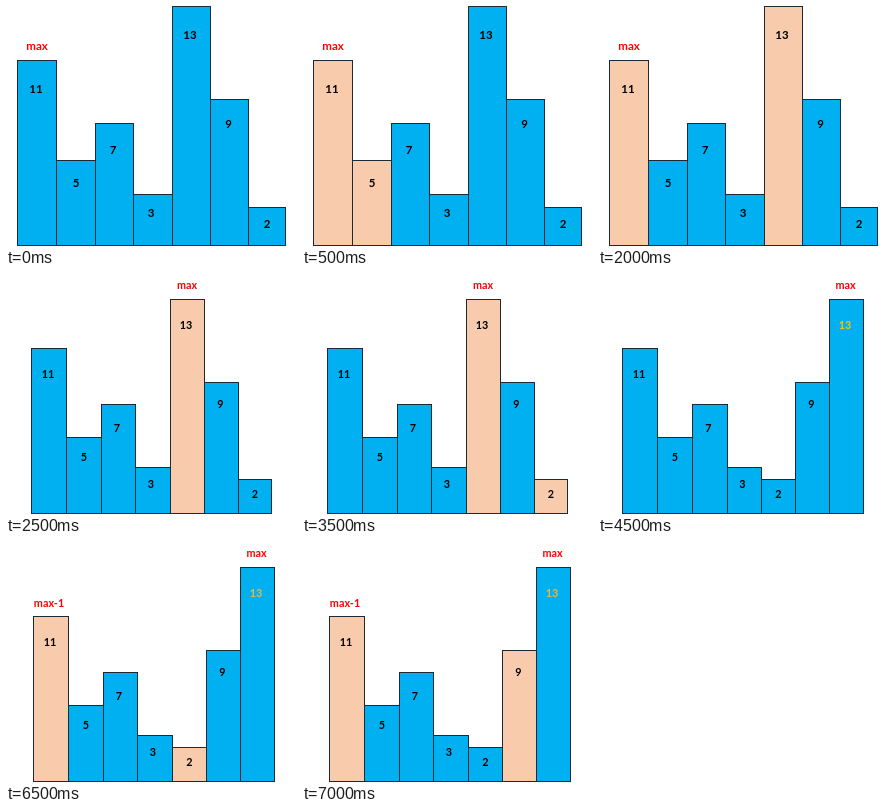
An HTML page for the animation above (7.5 s loop, 290 by 240 pixels).

```html
<!DOCTYPE html>
<html lang="en">
<head>
<meta charset="utf-8">
<title>Selection sort</title>
<style>
html, body { margin: 0; width: 100%; height: 100%; overflow: hidden; background: #fff; }
svg { display: block; }
text { font-family: Lato, "Open Sans", sans-serif; font-weight: 700; text-anchor: middle; }
rect { stroke: #1c2b33; stroke-width: 1; }
</style>
</head>
<body>
<svg id="stage" width="290" height="240" viewBox="0 0 290 240"></svg>
<script>
const STEP = 500, BASE = 239;
const BLUE = '#00b0f0', PEACH = '#f7cbac', RED = '#f00';

// Per value: bar height, number's drop below the top, its offset from the middle
const BARS = {
  11: [185, 29, -1], 5: [85, 23, 0], 7: [122, 27, -1.5], 3: [51, 19, -2],
  13: [239, 29, -1.5], 9: [146, 24.5, -1], 2: [38, 17, 0]
};
const start = [11, 5, 7, 3, 13, 9, 2];
const swapped = [11, 5, 7, 3, 2, 9, 13];

const wide = {
  order: start, scale: 1, size: 11.5,
  edges: [11, 50, 89, 127, 166, 204, 242, 279],
  labels: [['max', 31, 40]]
};
const found = {
  order: start, scale: 0.894, size: 10.8,
  edges: [25, 60, 95, 129, 164, 198, 232, 265],
  labels: [['max', 181, 11]]
};
const moved = {
  ...found, order: swapped,
  edges: [24, 59, 94, 129, 163, 197, 231, 265],
  labels: [['max', 247.5, 11]]
};
const placed = { ...moved, done: '#ffc000' };
const second = {
  ...moved, done: '#e3b84a',
  edges: [27, 62, 97, 131, 166, 200, 234, 268],
  labels: [['max', 250.5, 11], ['max-1', 43, 61]]
};

// Each step: layout, then the values being compared
const steps = [
  [wide], [wide, 11, 5], [wide, 11, 7], [wide, 11, 3], [wide, 11, 13],
  [found, 13], [found, 13, 9], [found, 13, 2],
  [moved, 13, 2], [placed],
  ...[5, 7, 3, 2, 9].map(v => [second, 11, v])
];

const stage = document.getElementById('stage');

function label(text, x, y, size, fill) {
  return `<text x="${x}" y="${y + size * 0.36}" font-size="${size}" fill="${fill}">${text}</text>`;
}

function draw([layout, ...active]) {
  const { order, scale, size, edges, labels, done } = layout;
  const bars = order.map((value, i) => {
    const [height, drop, dx] = BARS[value];
    const x = edges[i], w = edges[i + 1] - x;
    const h = Math.round(height * scale), top = BASE - h;
    const ink = value === 13 && done || '#000';
    return `<rect x="${x + 0.5}" y="${top + 0.5}" width="${w}" height="${h}" fill="${active.includes(value) ? PEACH : BLUE}"/>`
      + label(value, x + 0.5 + w / 2 + dx, top + drop * scale, size, ink);
  });
  const tags = labels.map(([text, x, y]) => label(text, x, y, size, RED));
  stage.innerHTML = bars.concat(tags).join('');
}

const origin = performance.now();
let shown = -1;
function tick() {
  const elapsed = Math.max(0, performance.now() - origin);
  const index = Math.floor(elapsed / STEP) % steps.length;
  if (index !== shown) draw(steps[shown = index]);
  requestAnimationFrame(tick);
}
tick();
</script>
</body>
</html>
```
